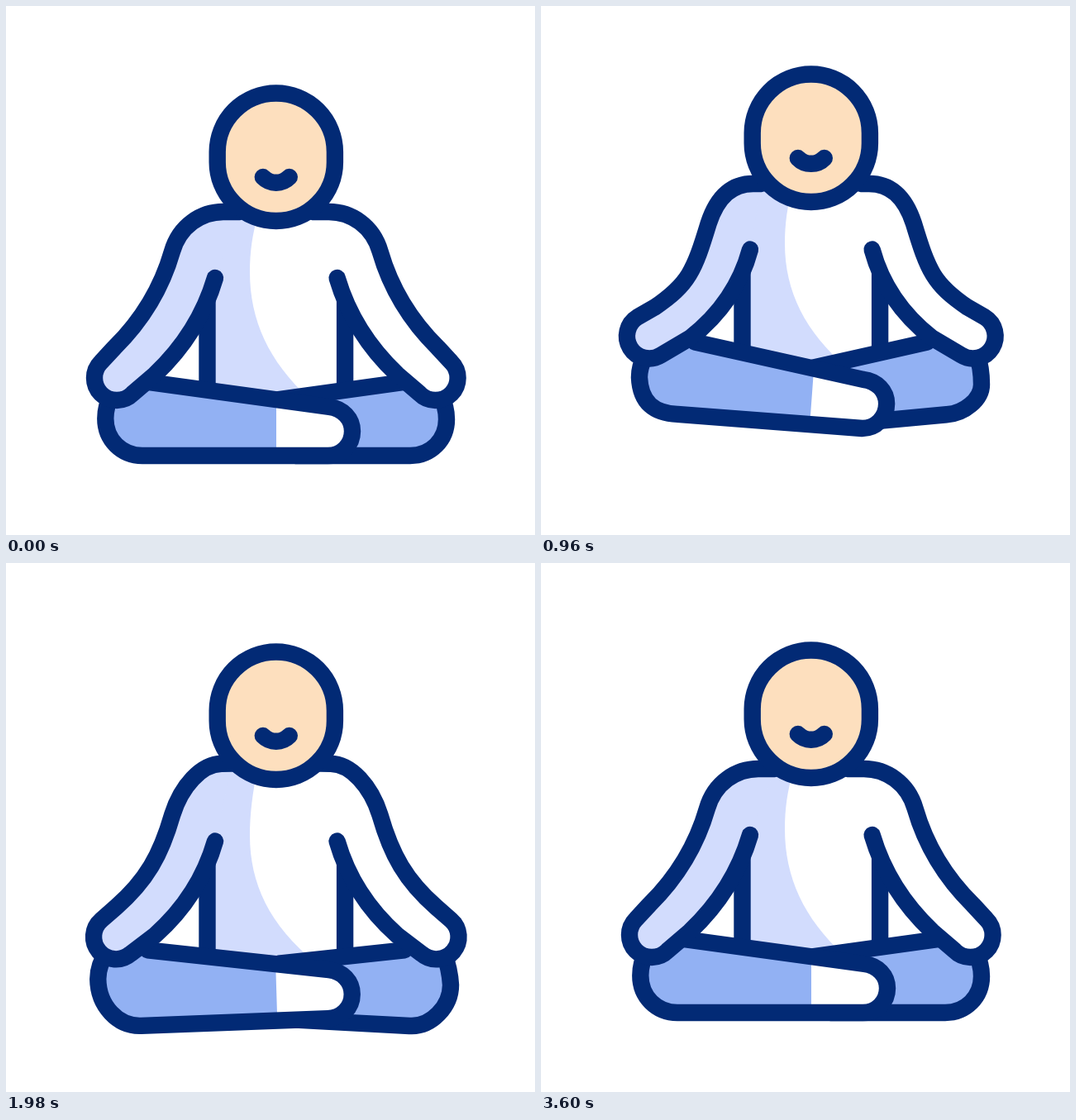
An HTML page with a canvas for the animation above (3.62 s loop, 640 px wide and 640 px high).

```html
<!DOCTYPE html>
<html lang="en">
<head>
<meta charset="utf-8">
<title>Meditation</title>
<style>
  html, body { margin: 0; width: 100%; height: 100%; overflow: hidden; background: #fff; }
  canvas { display: block; width: 640px; height: 640px; }
</style>
</head>
<body>
<canvas id="stage" width="640" height="640"></canvas>
<script>
const ctx = document.getElementById('stage').getContext('2d');
const NAVY = '#022a75', SKIN = '#fddfbe', LILAC = '#d2dcfd', BLUE = '#92b1f3', WHITE = '#fff';
const LOOP = 3620, STEP = 20, PHASE = 1200, AXIS = 653.6;

// Weights of the raised and the lowered pose; the rest pose is the base.
let up = 0, down = 0;

function setPose(ms) {
  const phase = Math.floor(ms / PHASE);
  const u = (ms % PHASE) / PHASE;
  const s = u * u * (3 - 2 * u);
  up = [s, 1 - s, 0, 0][phase];
  down = [0, s, 1 - s, 0][phase];
}

const mix = (rest, dUp, dDown) => rest + up * dUp + down * dDown;
// Point at rest, with vertical then horizontal shifts for the two poses.
const pt = (x, y, yUp = 0, yDown = 0, xUp = 0, xDown = 0) =>
  [mix(x, xUp, xDown), mix(y, yUp, yDown)];

const move = p => ctx.moveTo(...p);
const line = p => ctx.lineTo(...p);
const curve = (a, b, c) => ctx.bezierCurveTo(...a, ...b, ...c);

function paint(trace, fill, stroke = true) {
  ctx.beginPath();
  trace();
  if (fill) { ctx.fillStyle = fill; ctx.fill(); }
  if (stroke) ctx.stroke();
}

function mirrored(draw) {
  ctx.save();
  ctx.translate(AXIS, 0);
  ctx.scale(-1, 1);
  draw();
  ctx.restore();
}

function shirt() {
  paint(() => {
    move(pt(305, 253, -38.4, 6.4));
    curve(pt(298, 275, -38.4, 18), pt(295, 298, -38.4, 25.6), pt(295, 322, -38.4, 25.6));
    curve(pt(295, 380, -38.4, 25.6), pt(318, 430, -40, 27, 2), pt(366, 474, -41, 29, 4, 10));
    line(pt(243.5, 466, -53, 33));
    line(pt(243.5, 340, -38.4, 25.6));
    line(pt(230, 300, -38.4, 25.6));
    line(pt(263, 249, -38.4, 6.4));
  }, LILAC, false);
}

function side() {
  paint(() => {
    move(pt(243.5, 357, -38.4, 25.6));
    line(pt(243.5, 465, -52, 34));
  });
}

function footEnd() {
  line(pt(391, 485, -37, 24.5, -1.5));
  curve(pt(407.5, 487, -37, 24.5, -1), pt(419, 499, -37, 24.5, -1), pt(419, 514.5, -37, 24.5, -1));
  curve(pt(419, 531, -37, 24.5, -1), pt(406, 544, -36.8, 24, -1), pt(389.5, 544, -36.8, 24.5, -1));
}

function frontLeg() {
  const trace = () => {
    move(pt(172, 455, -54, 39.8, 16, -7));
    footEnd();
    line(pt(165, 544, -56, 44, 0, -2));
    curve(pt(140, 544, -57, 46, -3, -5), pt(120.3, 525, -50, 35, 0, -12), pt(120.3, 499, -55.5, 28, -1.5, -12));
    curve(pt(120.3, 490, -58, 24, -1.5, -12), pt(122, 481, -55, 20, 0, -9), pt(128, 470, -55, 20, -2, -6));
  };
  paint(trace, BLUE, false);
  paint(() => {
    move(pt(327, 476, -41.5, 29, 3.5, -2.5));
    footEnd();
    line(pt(327, 544, -42, 29, -2, 2.5));
  }, WHITE, false);
  paint(trace);
}

function backLeg() {
  const trace = join => {
    move(pt(330, 476, -43, 29));
    line(pt(481.5, 455, -54, 39.8, -16, 7));
    join(pt(525.5, 470, -55, 20, 2, 4));
    curve(pt(531, 481, -55, 24, 0, 4), pt(533, 490, -52, 30, 0, 6), pt(533, 500, -47, 33, 0, 7));
    curve(pt(533, 525, -55, 37, 0, 7), pt(514, 544, -57, 47, -2, 2), pt(489, 544, -55.5, 44, 2, -2));
    line(pt(350, 544, -40.8, 28));
  };
  paint(() => trace(line), BLUE, false);
  paint(() => trace(move));
}

function arm(fill) {
  paint(() => {
    move(pt(283, 249, -38, 6, -18, -6));
    line(pt(263, 249, -38, 6.4, -7, 0));
    curve(pt(236, 249, -38, 6.4, -5, 2), pt(210, 266, -40, 22, 4, 1), pt(201, 297, -38.2, 25.6, 2, -0.5));
    curve(pt(188, 342, -24, 25.6, -3), pt(166, 379, -47, 25.6, 14), pt(131, 413.5, -54.5, 25.6, 7));
    const angle = Math.PI * mix(1.25, 0.083, 0);
    ctx.arc(...pt(134, 450, -56.5, 25.4, -3.4), 27, angle, angle - Math.PI, true);
    line(pt(180, 446, -50, 25.6, 1));
    curve(pt(216, 412, -46, 25.6, 4), pt(240, 373, -45, 25.6, 3), pt(253, 329, -38.4, 25.6));
  }, fill);
}

function head() {
  ctx.save();
  ctx.translate(0, mix(0, -25.6, 12.8));
  paint(() => ctx.roundRect(255.7, 105.5, 142.2, 154.5, 71.1), SKIN);
  paint(() => {
    ctx.moveTo(310.8, 207);
    ctx.bezierCurveTo(319.5, 216, 334.1, 216, 342.8, 207);
  });
  ctx.restore();
}

function frame(now) {
  setPose(Math.floor((now % LOOP) / STEP) * STEP);
  ctx.fillStyle = WHITE;
  ctx.fillRect(0, 0, 640, 640);
  ctx.strokeStyle = NAVY;
  ctx.lineWidth = 20.4;
  ctx.lineCap = ctx.lineJoin = 'round';
  shirt();
  side();
  mirrored(side);
  backLeg();
  frontLeg();
  arm(LILAC);
  mirrored(() => arm(WHITE));
  head();
  requestAnimationFrame(frame);
}
requestAnimationFrame(frame);
</script>
</body>
</html>
```
